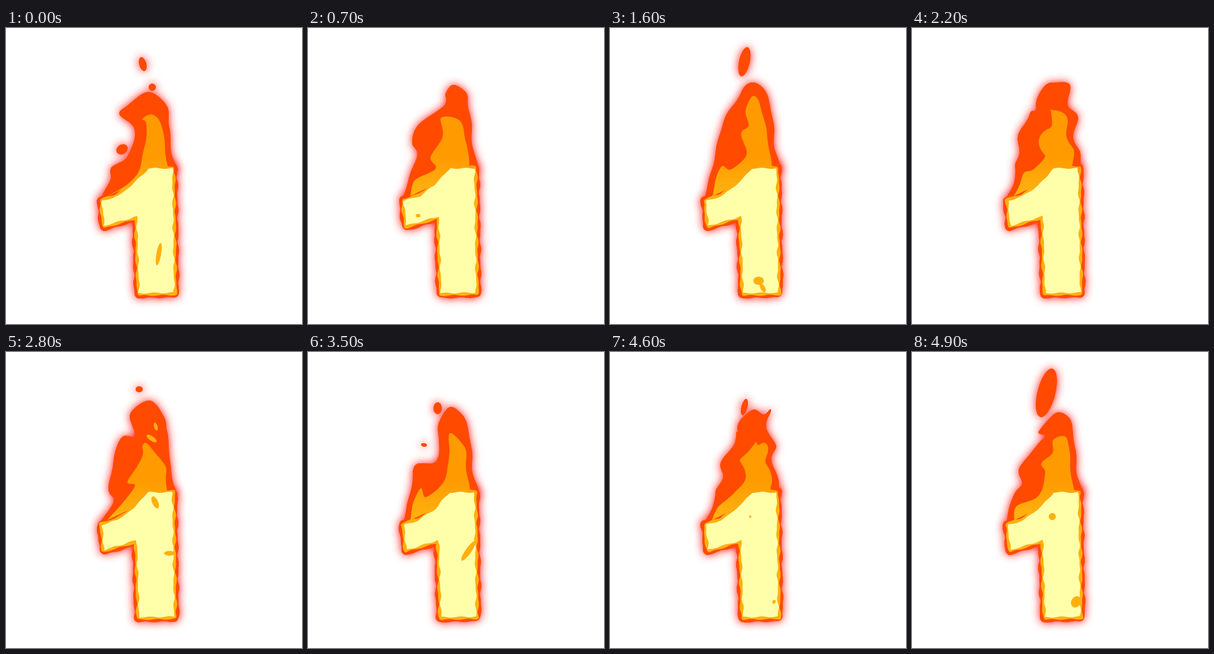
An HTML page with a canvas for the animation above (5000 ms loop, 500x500 px).

```html
<!DOCTYPE html>
<html>
<head>
<meta charset="utf-8">
<style>
html, body { margin: 0; width: 100%; height: 100%; overflow: hidden; background: #fff; }
canvas { display: block; }
</style>
</head>
<body>
<canvas id="stage" width="500" height="500"></canvas>
<script>
const ctx = document.getElementById('stage').getContext('2d');
const FRAMES = 50, RED = '#ff4a00', GOLD = '#ffb010', PALE = '#ffffaa';
const pairs = a => Array.from({ length: a.length / 2 }, (_, i) => [a[2 * i], a[2 * i + 1]]);
const mix = (a, b, u) => a + (b - a) * u;

const digit = pairs([240,237, 281,237, 284,447, 225,448, 221,318, 166,334, 162,292, 188,284, 213,266]);

// Every flame leaves the digit's arm and comes down along the same right side
const redFlame = tip => pairs([158,291, ...tip, 271,132, 276,165, 278,200, 284,224, 290,240]);
const orangeFlame = tip => pairs([172,284, ...tip, 267,190, 270,212, 273,236]);

// Key poses: flame tips; sparks and marks are ovals [x, y, rx, ry, tilt]
const poses = [
  { at: 0,
    red: redFlame([176,258, 177,236, 206,217, 217,170, 192,146, 203,132, 241,108]),
    orange: orangeFlame([208,262, 228,230, 238,165, 231,154, 246,146, 261,158]),
    sparks: [[231,61,6,12,-15], [247,100,6,6,0], [196,205,10,8,-30]],
    marks: [[258,382,4,19,10]] },
  { at: 7,
    red: redFlame([174,245, 184,212, 177,194, 186,163, 231,131, 232,110, 245,96, 267,110]),
    orange: orangeFlame([180,258, 216,238, 206,218, 228,185, 224,152, 255,156]),
    sparks: [],
    marks: [[186,317,4,3,0]] },
  { at: 16,
    red: redFlame([172,240, 178,212, 192,157, 213,124, 226,100, 243,92, 260,104]),
    orange: orangeFlame([187,235, 204,239, 231,212, 221,178, 233,165, 230,140, 240,115, 254,130]),
    sparks: [[227,57,9,25,12]],
    marks: [[251,427,9,7,0], [258,439,4,8,-30]] },
  { at: 28,
    red: redFlame([181,252, 174,228, 192,148, 216,141, 211,103, 242,82, 268,110]),
    orange: orangeFlame([196,255, 219,226, 206,218, 231,176, 231,158, 240,156]),
    sparks: [[225,63,6,5,0]],
    marks: [[246,146,10,4,35], [253,126,3,7,-15], [252,254,5,11,-25], [276,340,9,4,0]] },
  { at: 35,
    red: redFlame([165,272, 176,220, 183,190, 215,186, 222,150, 220,120, 240,93, 260,106]),
    orange: orangeFlame([180,250, 190,230, 200,245, 232,214, 238,170, 241,137, 264,160]),
    sparks: [[219,95,7,10,0], [196,157,5,3,10]],
    marks: [[271,336,5,20,35]] },
  { at: 42,
    red: redFlame([190,252, 176,238, 198,218, 184,185, 204,130, 230,126, 232,91, 246,99, 260,80]),
    orange: orangeFlame([190,258, 224,216, 231,175, 244,138, 255,170]),
    sparks: [[227,57,9,8,0]],
    marks: [[226,160,5,10,0], [251,286,18,9,-35], [185,300,5,5,0], [267,298,8,4,-30]] },
  { at: 49,
    red: redFlame([172,240, 186,222, 182,195, 214,155, 226,142, 214,134, 243,103, 264,110]),
    orange: orangeFlame([178,260, 212,244, 226,205, 218,188, 237,170, 240,148, 262,145]),
    sparks: [[227,69,15,42,14]],
    marks: [[237,278,6,6,0], [277,422,8,10,30]] }
];

// Point at t (0..1) on an open Catmull-Rom curve
function pointOn(pts, t) {
  const last = pts.length - 1, s = t * last, i = Math.min(last - 1, Math.floor(s)), u = s - i;
  const [a, b, c, d] = [-1, 0, 1, 2].map(k => pts[Math.max(0, Math.min(last, i + k))]);
  return [0, 1].map(k => b[k] + u / 2 * (c[k] - a[k]
    + u * (2 * a[k] - 5 * b[k] + 4 * c[k] - d[k] + u * (3 * (b[k] - c[k]) + d[k] - a[k]))));
}

function shape(pts) {
  const path = new Path2D();
  pts.forEach(p => path.lineTo(...p));
  path.closePath();
  return path;
}

// Digit outline with slightly burnt, restless edges
function digitShape(phase) {
  const pts = [];
  digit.forEach(([x, y], i) => {
    const [X, Y] = digit[(i + 1) % digit.length], steps = Math.ceil(Math.hypot(X - x, Y - y) / 5);
    for (let j = 0; j < steps; j++) {
      const px = mix(x, X, j / steps), py = mix(y, Y, j / steps);
      pts.push([px + Math.sin(py * 0.17 + phase * 1.9) + 0.7 * Math.sin(py * 0.29 - phase * 2.7),
        py + Math.sin(px * 0.2 + phase * 2.3)]);
    }
  });
  return shape(pts);
}

// Blend two flame edges, with ripples that climb between poses
function flameShape(a, b, u, f) {
  const pts = [];
  for (let i = 0; i <= 120; i++) {
    const [x, y] = pointOn(a, i / 120), [X, Y] = pointOn(b, i / 120);
    const h = mix(y, Y, u), lift = Math.sin(Math.PI * u) * Math.max(0, 285 - h) / 190;
    pts.push([mix(x, X, u) + (1 + 7 * lift) * Math.sin(h * 0.11 + f * 1.3),
      h + 5 * lift * Math.sin(i * 0.33 + f * 0.9)]);
  }
  return shape(pts);
}

function ovals(list, color, size, rise = 0) {
  ctx.fillStyle = color;
  for (const [x, y, rx, ry, tilt] of list) {
    ctx.beginPath();
    ctx.ellipse(x, y - rise, rx * size, ry * size, tilt * Math.PI / 180, 0, 7);
    ctx.fill();
  }
}

function outline(path, color, width) {
  ctx.strokeStyle = color;
  ctx.lineWidth = width;
  ctx.stroke(path);
}

function fill(path, color) {
  ctx.fillStyle = color;
  ctx.fill(path);
}

const orange = ctx.createLinearGradient(0, 215, 0, 275);
orange.addColorStop(0, '#ff9a00');
orange.addColorStop(1, GOLD);
ctx.lineJoin = 'round';
ctx.shadowColor = '#ff1414';

function draw(f) {
  const k = poses.findLastIndex(p => p.at <= f);
  const a = poses[k], b = poses[(k + 1) % poses.length];
  const span = (b.at || FRAMES) - a.at, u = (f - a.at) / span;
  const near = u < 0.5 ? a : b, age = u < 0.5 ? u * span : (u - 1) * span;
  const size = Math.max(0, 1 - Math.abs(age) / 4.5);
  const flame = flameShape(a.red, b.red, u, f), inner = flameShape(a.orange, b.orange, u, f);
  const [rim, ring, core] = [0, 1, 2].map(i => digitShape(f + i));

  ctx.fillStyle = '#fff';
  ctx.shadowBlur = 0;
  ctx.fillRect(0, 0, 500, 500);
  // The second pass covers the glow that fell inside the fire
  for (const blur of [15, 0]) {
    ctx.shadowBlur = blur;
    ovals(near.sparks, RED, size, 8 * age);
    fill(flame, RED);
    outline(rim, RED, 16);
  }
  fill(inner, orange);
  fill(ring, orange);
  outline(ring, orange, 8);
  fill(core, PALE);
  ovals(near.marks, GOLD, size);
}

function tick() {
  draw(Math.floor(performance.now() / 100) % FRAMES);
  requestAnimationFrame(tick);
}
tick();
</script>
</body>
</html>
```
